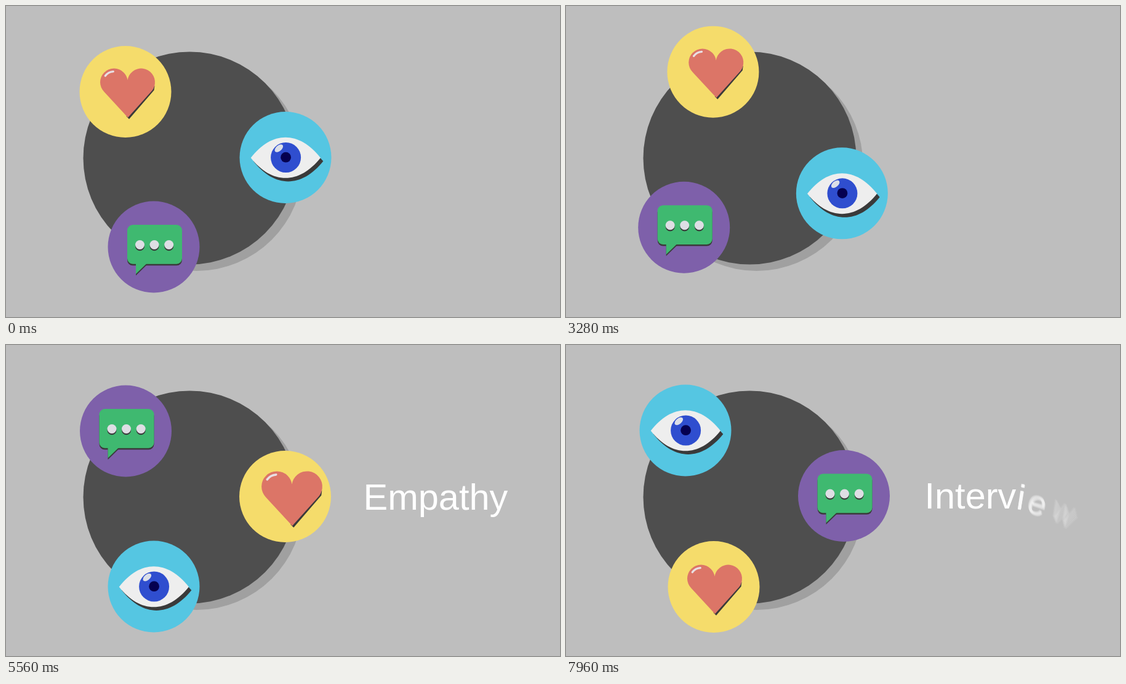
These frames come from a looping animation (900 by 506 pixels, 8 s). An HTML page with a canvas:

```html
<!DOCTYPE html>
<html lang="en">
<head>
<meta charset="utf-8">
<title>Observe, Empathy, Interview</title>
<style>
  html, body { margin: 0; width: 100%; height: 100%; overflow: hidden; background: #bebebe; }
  canvas { display: block; width: 900px; height: 506px; }
</style>
</head>
<body>
<canvas id="stage" width="900" height="506"></canvas>
<script>
const ctx = document.getElementById('stage').getContext('2d');
const LOOP = 8000;
const ORBIT = { x: 300, y: 251 };
const TURNS = [3030, 6838];
const TURN_MS = 900;
const DARK = '#3a3a3a';
const FONT = '59.5px "Liberation Sans", Arial, sans-serif';

const clamp = v => Math.max(0, Math.min(1, v));
const ease = u => 0.5 - 0.5 * Math.cos(Math.PI * clamp(u));
const mix = (a, b, s) => a + (b - a) * s;
const ramp = (t, start, length) => ease((t - start) / length);
const pulse = (t, start, length) => Math.sin(Math.PI * clamp((t - start) / length));

// Stops on the orbit, and for each turn how far the path bows outwards and ahead (degrees).
const orbs = [
  { color: '#f5dc6b', draw: drawHeart, stops: [[194, 139.5], [453.5, 246.5], [240, 393.5]],
    bow: [4.2, -3], lead: [-5.4, 0] },
  { color: '#7e60aa', draw: drawChat, stops: [[240, 392], [194.5, 140], [451.5, 245.5]],
    bow: [1, 1.6], lead: [2.2, 0] },
  { color: '#55c6e2', draw: drawEye, stops: [[454, 246.5], [240, 393], [194, 139]],
    bow: [6.3, -4], lead: [1.7, -0.4] }
];

const words = [
  { text: 'Observe', x: 580, y: 267.5, enter: 230, leave: 2750 },
  { text: 'Empathy', x: 580.5, y: 268, enter: 4200, leave: 6718 },
  { text: 'Interview', x: 582.5, y: 265.5, enter: 7722, leave: Infinity }
];

function polar([x, y]) {
  return { r: Math.hypot(x - ORBIT.x, y - ORBIT.y), a: Math.atan2(y - ORBIT.y, x - ORBIT.x) };
}

function orbPosition(orb, t) {
  const turn = t < TURNS[1] ? 0 : 1;
  const s = ramp(t, TURNS[turn], TURN_MS);
  const from = polar(orb.stops[turn]);
  const to = polar(orb.stops[turn + 1]);
  if (to.a < from.a) to.a += 2 * Math.PI;
  const bump = 4 * s * (1 - s);
  const r = mix(from.r, to.r, s) + orb.bow[turn] * bump;
  const a = mix(from.a, to.a, s) + orb.lead[turn] * bump * Math.PI / 180;
  return [ORBIT.x + r * Math.cos(a), ORBIT.y + r * Math.sin(a)];
}

function disc(x, y, r, color) {
  ctx.fillStyle = color;
  ctx.beginPath();
  ctx.arc(x, y, r, 0, 2 * Math.PI);
  ctx.fill();
}

function polygon(points, color) {
  ctx.fillStyle = color;
  ctx.beginPath();
  points.forEach(([x, y]) => ctx.lineTo(x, y));
  ctx.fill();
}

function drawHeart(t) {
  const focus = ramp(t, TURNS[0], TURN_MS) * (1 - ramp(t, TURNS[1], 400));
  const late = ramp(t, TURNS[1], 400);
  const beat = 1 + 0.12 * (pulse(t, 5100, 300) + pulse(t, 5450, 300));
  ctx.translate(3.5 + 7.5 * focus - 2 * late, focus + 2 * late);
  ctx.scale(beat, beat);
  polygon([[44, -10], [43, -2.5], [2.5, 44.5], [-2, 40]], DARK);

  const r = 22.4, cx = 22.1, cy = -15.5;
  const q = 0.75 * Math.PI;
  ctx.fillStyle = '#dc7567';
  ctx.beginPath();
  ctx.moveTo(0.5, 42);
  ctx.arc(-cx, cy, r, q, -0.12);
  ctx.arc(cx, cy, r, Math.PI + 0.12, Math.PI - q);
  ctx.closePath();
  ctx.fill();

  ctx.strokeStyle = '#e8e0e4';
  ctx.lineWidth = 3.2;
  ctx.lineCap = 'round';
  ctx.beginPath();
  ctx.arc(-cx, cy, 17.5, 1.2 * Math.PI, 1.48 * Math.PI);
  ctx.stroke();
}

function bubble(dy, color) {
  ctx.fillStyle = color;
  ctx.beginPath();
  ctx.roundRect(-43, -36 + dy, 89, 63.7, 9);
  ctx.fill();
  polygon([[-29, 26 + dy], [-29, 44 + dy], [-11.5, 27 + dy]], color);
}

function drawChat() {
  bubble(2.6, DARK);
  bubble(0, '#3fb970');
  for (const x of [-22.5, 1, 24.7]) {
    disc(x, -1.2, 7.5, DARK);
    disc(x, -3.5, 7.5, '#dedee4');
  }
}

function almond(dx, dy) {
  ctx.beginPath();
  ctx.moveTo(-56.3 + dx, 0.5 + dy);
  ctx.bezierCurveTo(-22 + dx, -43.7 + dy, 22 + dx, -43.7 + dy, 57 + dx, 0.5 + dy);
  ctx.bezierCurveTo(22 + dx, 44.3 + dy, -22 + dx, 44.3 + dy, -56.3 + dx, 0.5 + dy);
}

function gaze(t) {
  const left = ramp(t, 800, 250) * (1 - ramp(t, 1300, 300));
  const right = ramp(t, 1400, 300) * (1 - ramp(t, 2130, 500));
  return 12 * (right - left);
}

function drawEye(t) {
  ctx.fillStyle = DARK;
  almond(4.3, 5.6);
  ctx.fill();
  ctx.fillStyle = '#eeeeee';
  almond(0, 0);
  ctx.fill();
  ctx.clip();

  const x = 0.6 + gaze(t);
  disc(x, 0, 24.5, '#2f4ecf');
  disc(x, -0.3, 8.4, '#050050');
  ctx.fillStyle = '#dcdfe8';
  ctx.beginPath();
  ctx.ellipse(x - 11.3, -15, 8, 4.6, -0.7, 0, 2 * Math.PI);
  ctx.fill();

  const lid = ramp(t, 6340, 120) * (1 - ramp(t, 6500, 140));
  if (lid > 0) {
    const edge = mix(-43.7, 46, lid);
    ctx.fillStyle = '#202020';
    ctx.beginPath();
    ctx.moveTo(-60, -45);
    ctx.lineTo(-60, 0.5);
    ctx.bezierCurveTo(-22, edge, 22, edge, 60, 0.5);
    ctx.lineTo(60, -45);
    ctx.fill();
  }
}

// k is how many letter steps this letter still is from its resting place.
function drawLetter(char, x, y, width, k) {
  const samples = k > 0 ? 7 : 1;
  const alpha = clamp(1 - 0.06 * k * k);
  ctx.globalAlpha = 1 - Math.pow(1 - Math.min(alpha, 0.995), 1 / samples);
  if (samples === 1) ctx.globalAlpha = 1;
  for (let j = 0; j < samples; j++) {
    const p = samples === 1 ? 0 : k * (1 + 0.24 * (j / (samples - 1) - 0.5));
    ctx.save();
    ctx.translate(x + width / 2 + p * p, y - 16 + 3 * p * p);
    ctx.rotate(p * 9 * Math.PI / 180);
    ctx.scale(1 - 0.05 * p, 1 - 0.05 * p);
    ctx.fillText(char, -width / 2, 16);
    ctx.restore();
  }
  ctx.globalAlpha = 1;
}

function drawWord({ text, x, y, enter, leave }, t) {
  const front = Math.min((t - enter) * 0.021, (leave - t) * 0.021);
  if (front < -4) return;
  ctx.font = FONT;
  ctx.fillStyle = '#fff';
  [...text].forEach((char, i) => {
    const k = Math.max(0, i - front);
    if (k >= 4) return;
    const width = ctx.measureText(char).width;
    const left = x + ctx.measureText(text.slice(0, i + 1)).width - width;
    drawLetter(char, left, y, width, k);
  });
}

function render(t) {
  ctx.fillStyle = '#bebebe';
  ctx.fillRect(0, 0, 900, 506);
  disc(309.5, 258, 173, '#a0a0a0');
  disc(298.5, 247.5, 173, '#4e4e4e');
  for (const orb of orbs) {
    const [x, y] = orbPosition(orb, t);
    ctx.save();
    ctx.translate(x, y);
    disc(0, 0, 74.5, orb.color);
    orb.draw(t);
    ctx.restore();
  }
  words.forEach(word => drawWord(word, t));
}

const began = performance.now();
function tick() {
  render((performance.now() - began) % LOOP);
  requestAnimationFrame(tick);
}
tick();
</script>
</body>
</html>
```
